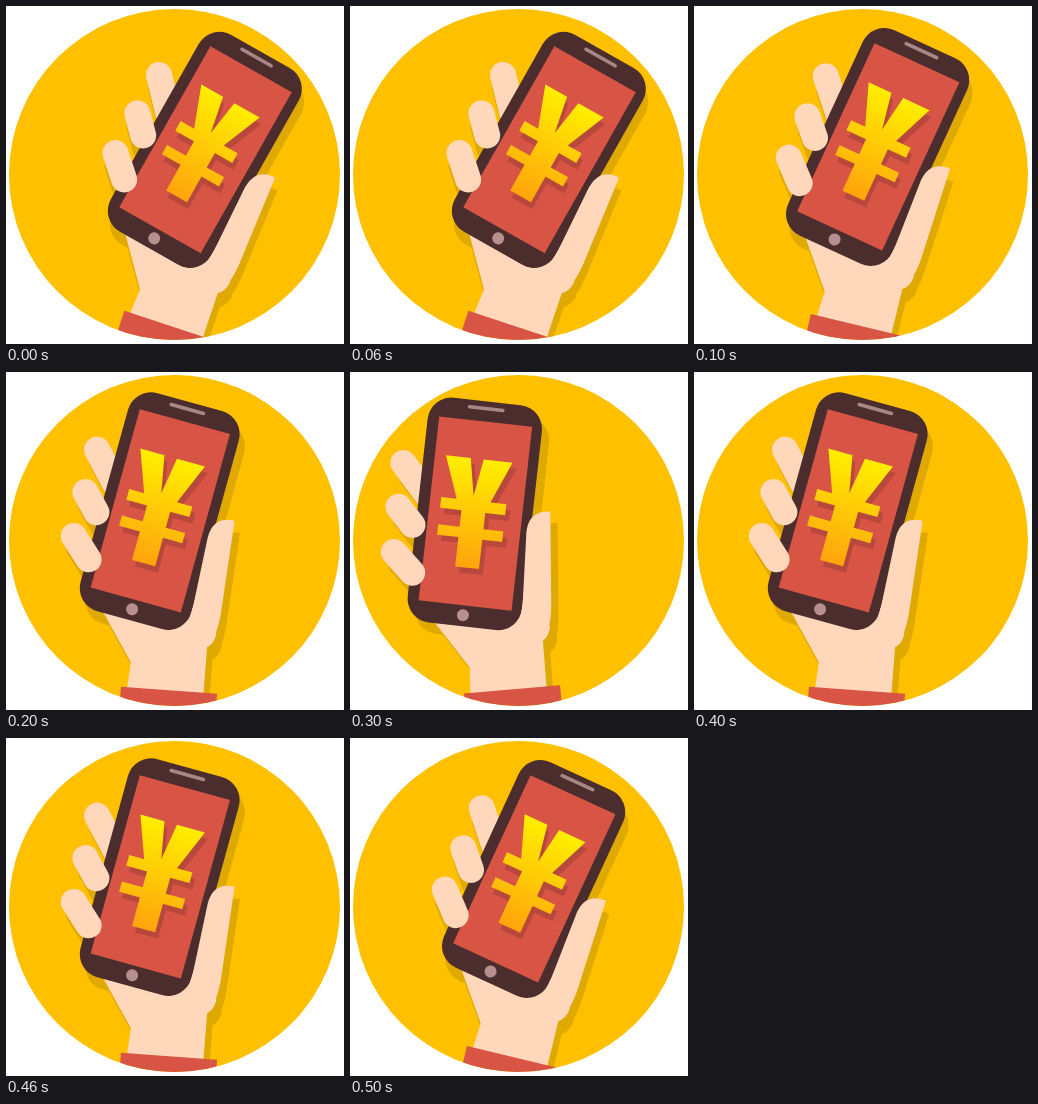
An HTML page for the animation above (0.6 s loop, 338 px wide and 338 px high).

```html
<!DOCTYPE html>
<html lang="en">
<head>
<meta charset="utf-8">
<title>Phone payment</title>
<style>
  html, body { margin: 0; width: 100%; height: 100%; overflow: hidden; background: #fff; }
  svg { display: block; width: 100vw; height: 100vh; }
</style>
</head>
<body>
<svg viewBox="0 0 338 338">
  <defs>
    <clipPath id="disc"><circle cx="168.5" cy="168.5" r="165.5"/></clipPath>
    <linearGradient id="gold" x1="0" y1="0" x2="0" y2="1">
      <stop offset="0" stop-color="#ffee00"/>
      <stop offset="1" stop-color="#ffa40c"/>
    </linearGradient>

    <!-- The phone stands upright; the origin is the pivot in the wrist. -->
    <path id="palm" d="M-100-85L-80-65L-40-24L-36 8L44 2L38-15L29.5-59Q35-63 35-74L0-110Z"/>
    <path id="thumb" d="M1-165Q1-187 22.5-188L34-94Q36-70 29.5-59L3-72Q5.2-80 5.2-95Z"/>
    <path id="cuff" d="M-43 2.3L51.5-16.5L60 24L-35 43Z"/>
    <rect id="phone" x="-109.8" y="-290.5" width="115" height="226.2" rx="24"/>
    <path id="index" d="M-129-220L-100-189" stroke-width="26" stroke-linecap="round"/>
    <path id="fingers" d="M-129-176L-113-159.5M-128.5-130.6L-108-112" stroke-width="26" stroke-linecap="round"/>
    <path id="yen" d="M-87.5-232.5H-62.5L-55.5-195L-49.5-232.5H-20.5L-38-190.5H-22V-179.5H-42V-163H-22V-152.5H-42V-123H-66V-152.5H-87.5V-163H-66V-179.5H-87.5V-190.5H-72Z"/>
  </defs>

  <g clip-path="url(#disc)">
    <rect width="338" height="338" fill="#ffc000"/>
    <g id="arm">
      <g transform="translate(8.5 10.5)" fill="#dfa900" stroke="#dfa900">
        <g stroke="none">
          <use href="#palm"/><use href="#thumb"/><use href="#phone"/>
        </g>
        <use href="#index"/><use href="#fingers"/>
      </g>
      <use href="#palm" fill="#ffd7ba"/>
      <use href="#cuff" fill="#d85546"/>
      <use href="#index" stroke="#ffd7ba"/>
      <use href="#phone" fill="#4b2d2e"/>
      <rect x="-98.5" y="-270.3" width="93.5" height="185"  fill="#d85546"/>
      <path d="M-69.5-283.2H-36" stroke="#a98787" stroke-width="3.6" stroke-linecap="round"/>
      <circle cx="-52.8" cy="-75.4" r="6" fill="#b78f8f"/>
      <use href="#yen" x="4.5" y="5.5" fill="#b8483b"/>
      <use href="#yen" fill="url(#gold)"/>
      <use href="#thumb" fill="#ffd7ba"/>
      <use href="#fingers" stroke="#ffd7ba"/>
    </g>
  </g>
</svg>
<script>
  const STEP = 100;
  const tilts = [29.5, 24.7, 15.4, 6.4, 15.4, 24.7]; // swing out and back, held per step
  const arm = document.getElementById('arm');
  const start = performance.now();

  function draw(now) {
    const step = Math.floor(Math.max(0, now - start) / STEP) % tilts.length;
    arm.setAttribute('transform', `translate(157 324) rotate(${tilts[step]})`);
    requestAnimationFrame(draw);
  }
  draw(start);
</script>
</body>
</html>
```
